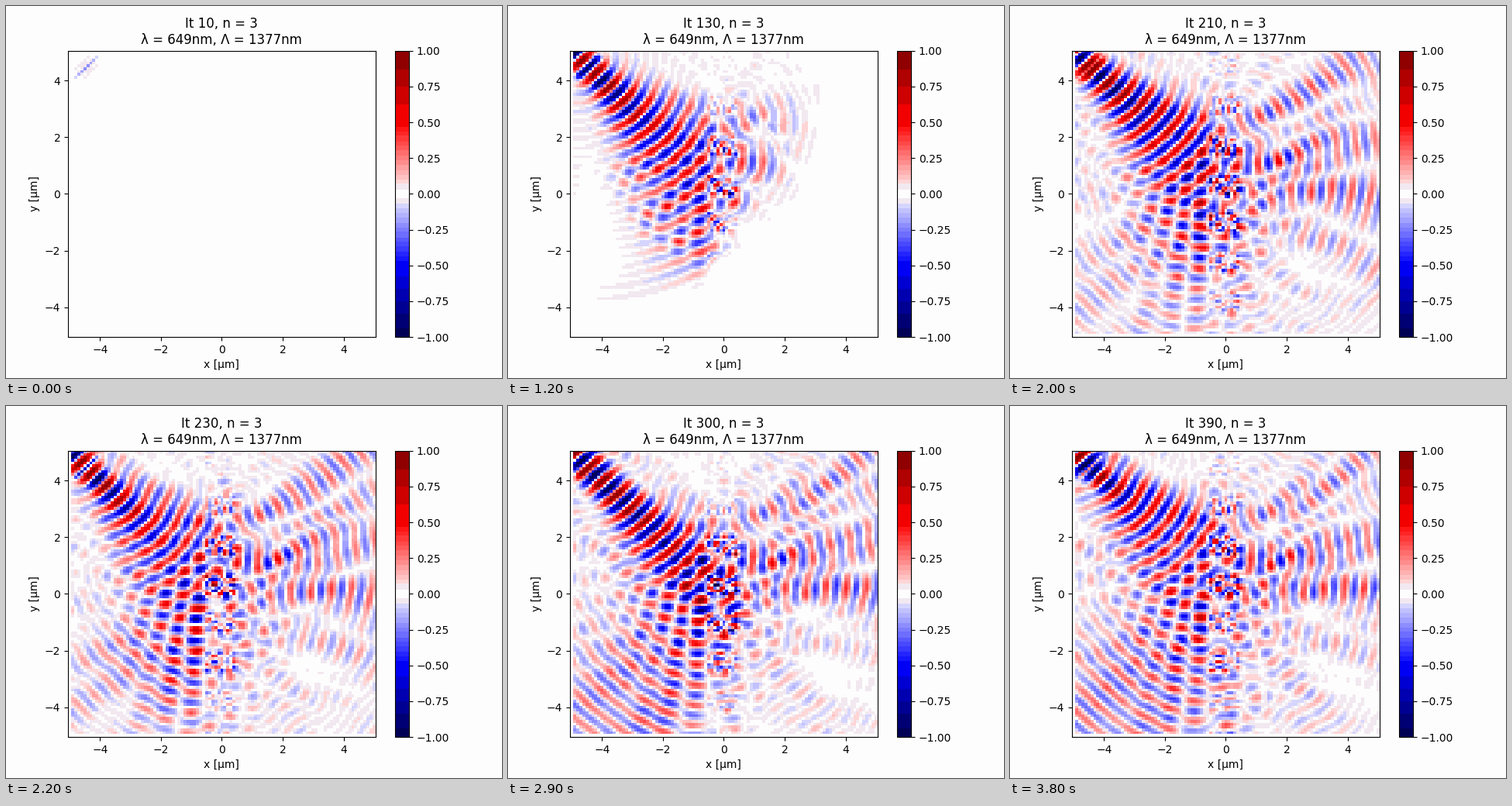
A matplotlib script for the animation above (3900 ms loop, 640 px wide and 480 px high).

```python
import matplotlib.pyplot as plt
import numpy as np
from matplotlib.animation import FuncAnimation
from matplotlib.colors import ListedColormap

# Lengths in micrometres; n scales the rods' permittivity
WAVELENGTH, PERIOD, N = 0.649, 1.377, 3
STEP, CELLS, PAD = 0.1, 101, 40
COURANT = 1 / np.sqrt(2)
FRAMES, STEPS_PER_FRAME = 39, 10
PAPER = "#fdfdfd"


def source(n):
    """Ramped sine that drives the diagonal emitter."""
    ramp = 1 / (1 + np.exp(-(n - 11.5) / 1.5))
    omega = 2 * np.pi * COURANT * STEP / WAVELENGTH
    return -ramp * np.sin(omega * n + 0.4)


def laplacian(u):
    return (np.roll(u, 1, 0) + np.roll(u, -1, 0)
            + np.roll(u, 1, 1) + np.roll(u, -1, 1) - 4 * u)


def simulate():
    """Scalar wave through a grating of rods, inside an absorbing margin."""
    size = CELLS + 2 * PAD
    axis = (np.arange(size) - size // 2) * STEP
    x, y = np.meshgrid(axis, axis)
    rods = (x > -0.55) & (x < 0.45) & (np.mod(y, PERIOD) < PERIOD / 2)
    speed = COURANT**2 / np.where(rods, N, 1)

    depth = np.clip(np.abs(axis) - CELLS // 2 * STEP, 0, None) / (PAD * STEP)
    loss = 0.2 * np.maximum.outer(depth, depth) ** 2

    spot = np.arange(1, 11)
    cols, rows = PAD + spot, PAD + spot + 89
    taper = np.sin(np.pi * (spot - 0.5) / 10)
    view = slice(PAD, PAD + CELLS)
    u, old = np.zeros((size, size)), np.zeros((size, size))
    shots = []
    for n in range(1, FRAMES * STEPS_PER_FRAME + 1):
        new = (2 * u - (1 - loss) * old + speed * laplacian(u)) / (1 + loss)
        new[rows, cols] += taper * (source(n) - source(n - 2))
        u, old = new, u
        if n % STEPS_PER_FRAME == 0:
            shot = u[view, view].copy()
            shot[0, :] = 0
            shot[:, 0] = 0
            shots.append(shot)
    return shots


def banded_map():
    """Seismic colours in flat bands, fine near zero and coarse outside."""
    fine = np.linspace(0.033, 0.473, 14)
    low = [-1, -0.94, -0.84, -0.755, -0.67, -0.58]
    edges = np.concatenate([low, -fine[::-1], fine, [0.625, 0.75, 0.873, 1]])
    mids = (edges[1:] + edges[:-1]) / 2
    colors = plt.get_cmap("seismic")((mids + 1) / 2)[:, :3]
    zero = np.argmin(np.abs(mids))
    colors[zero] = np.array([253, 253, 253]) / 255
    colors[[zero - 1, zero + 1]] = np.array([242, 232, 240]) / 255
    values = np.linspace(-1, 1, 256)
    band = np.searchsorted(edges, values, side="right") - 1
    return ListedColormap(colors[np.clip(band, 0, len(colors) - 1)])


shots = simulate()
half = CELLS * STEP / 2

plt.rcParams["font.family"] = "DejaVu Sans"
fig, ax = plt.subplots(figsize=(6.4, 4.8), dpi=100, facecolor=PAPER)
image = ax.imshow(shots[0], cmap=banded_map(), vmin=-1, vmax=1,
                  origin="lower", extent=(-half, half, -half, half),
                  aspect="auto", interpolation="nearest")
fig.colorbar(image, ax=ax)
ax.set_xlabel("x [µm]")
ax.set_ylabel("y [µm]")
title = ax.set_title("")


def update(i):
    image.set_data(shots[i])
    title.set_text(f"It {(i + 1) * STEPS_PER_FRAME}, n = {N}\n"
                   f"λ = {WAVELENGTH * 1000:.0f}nm, "
                   f"Λ = {PERIOD * 1000:.0f}nm")
    return image, title


anim = FuncAnimation(fig, update, frames=FRAMES, interval=100,
                     repeat=True, repeat_delay=0, blit=False)
plt.show()
```
